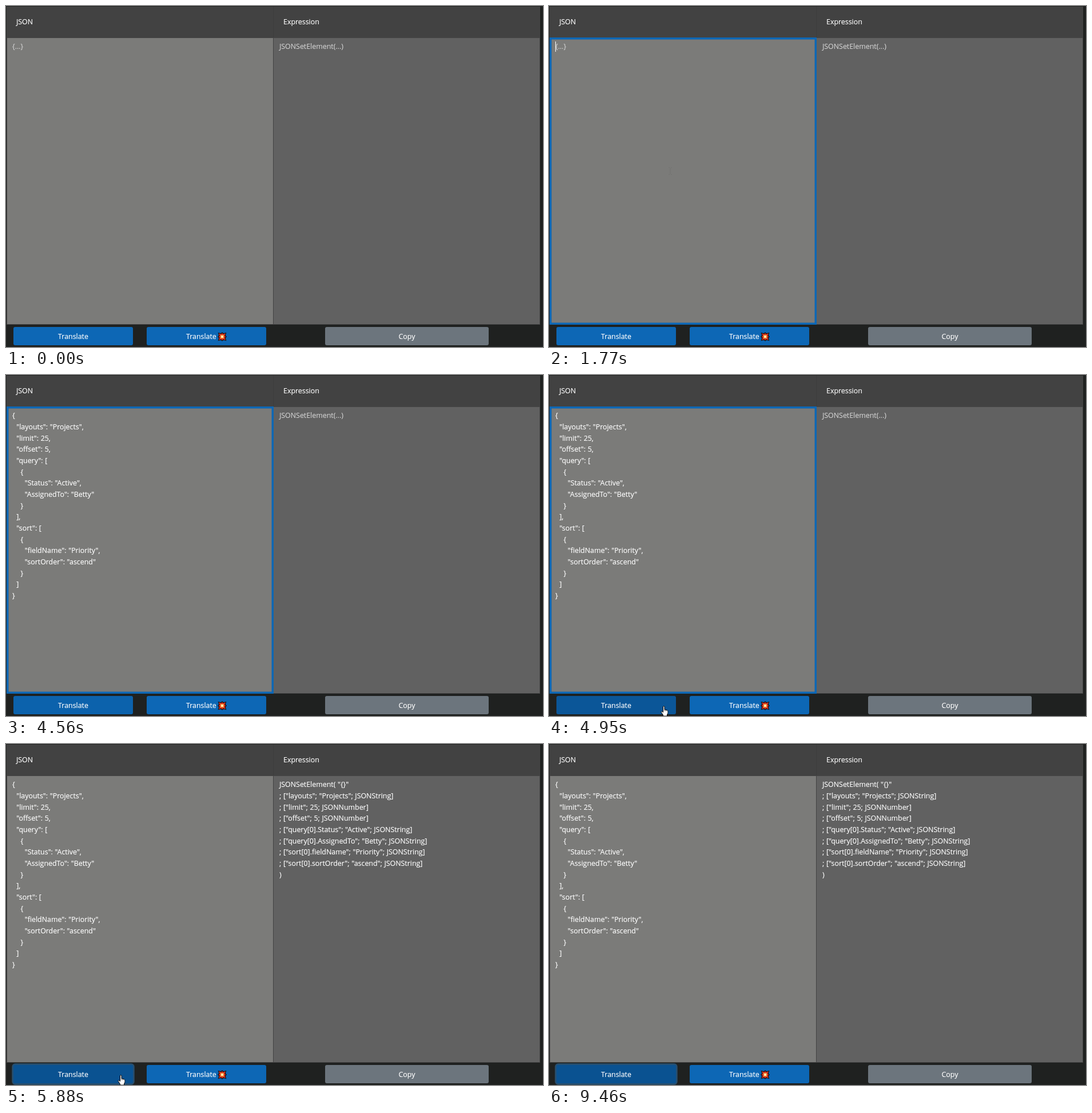
An HTML page that plays this animation: 939x596 px, repeating every 9780 ms.

```html
<!DOCTYPE html>
<html lang="en">
<head>
<meta charset="utf-8">
<title>JSON to expression</title>
<style>
html, body { margin: 0; width: 100%; height: 100%; overflow: hidden; background: #1f2120; }
#stage { position: relative; width: 939px; height: 596px; overflow: hidden; background: #1f2120; color: #fff;
  font: 12.4px/19.66px "Open Sans", "Noto Sans", sans-serif; word-spacing: .4px; -webkit-text-stroke: .15px; }
#stage > * { position: absolute; box-sizing: border-box; margin: 0; }
pre { font: inherit; white-space: pre; }
.head { top: 1px; height: 54px; background: #424242; padding: 17.4px 0 0 17px; }
.pane { top: 55px; height: 502px; border: 1px solid #444; }
.btn { top: 561px; height: 32px; border-radius: 3px; background: #0d67b5; text-align: center; padding-top: 6.6px; }
#focus { left: 1px; top: 55px; width: 467px; height: 502px; box-shadow: inset 0 0 0 3.5px #0d67b5; }
#caret { width: 1px; height: 18px; background: #fff; }
.hint { color: #d0d0d0; }
</style>
</head>
<body>
<div id="stage">
  <div class="head" style="left:1px;width:466px">JSON</div>
  <div class="head" style="left:467px;width:467px;border-left:1px solid #3c3c3c">Expression</div>
  <div class="pane" style="left:1px;width:467px;background:#7b7b79"></div>
  <div class="pane" style="left:467px;width:467px;background:#616161"></div>
  <div id="focus"></div>
  <pre id="json" style="left:11px;top:61.4px"></pre>
  <pre id="expr" style="left:478px;top:61.4px"></pre>
  <div id="caret"></div>
  <svg id="beam" style="left:209px;top:282px" width="6" height="13" fill="none" stroke="#737371">
    <path d="M0 .5H2M4 .5H6M3 1V12M0 12.5H2M4 12.5H6"/>
  </svg>
  <div class="btn" id="go" style="left:13px;width:209px">Translate</div>
  <div class="btn" style="left:246px;width:209px;text-align:left;padding-left:69px">Translate</div>
  <svg style="left:370px;top:570px" width="16" height="16" viewBox="-8 -8 16 16"><g id="burst"></g></svg>
  <div class="btn" style="left:558px;width:286px;background:#6c757d">Copy</div>
  <svg id="hand" style="left:0;top:0" width="13" height="19" fill="#fff" stroke="#000">
    <path d="M4 2C4 .3 6.5 .3 6.5 2V6.5L11 8Q12.5 8.6 12.5 10V13L11 16V18H4.5L3.5 15.5 .8 11.5Q.3 9.8 1.8 9.8L4 11.5Z"/>
    <path d="M6.5 6.5V9.5M9 7.5V9.5" stroke-width=".7"/>
  </svg>
</div>
<script>
const LOOP = 9780;
const $ = id => document.getElementById(id);

const data = {
  layouts: "Projects", limit: 25, offset: 5,
  query: [{ Status: "Active", AssignedTo: "Betty" }],
  sort: [{ fieldName: "Priority", sortOrder: "ascend" }]
};
const source = JSON.stringify(data, null, 2);

// Flatten the object into JSONSetElement arguments
function flatten(value, path) {
  if (Array.isArray(value)) return value.flatMap((v, i) => flatten(v, `${path}[${i}]`));
  if (typeof value === "object")
    return Object.entries(value).flatMap(([k, v]) => flatten(v, path ? path + "." + k : k));
  const type = typeof value === "string" ? "JSONString" : "JSONNumber";
  return [`; ["${path}"; ${JSON.stringify(value)}; ${type}]`];
}
const result = ['JSONSetElement( "{}"', ...flatten(data, ""), ")"].join("\n");

function star(outer, inner, fill) {
  const points = Array.from({ length: 16 }, (_, i) => {
    const a = i * Math.PI / 8 + Math.PI / 4;
    const r = i % 2 ? inner : outer * (i % 4 ? .75 : 1);
    return [r * Math.cos(a), r * Math.sin(a)].map(n => n.toFixed(2));
  });
  return `<polygon points="${points.join(" ")}" fill="${fill}"/>`;
}
$("burst").innerHTML = star(10.4, 6.4, "#1c0f0d") + star(8.4, 4.8, "#d8321f") +
  star(4.8, 2.6, "#f9a13a") + star(2.8, 1.6, "#fff3c4");

const within = (t, a, b) => t >= a && t < b;
const mix = (a, b, p) => a + (b - a) * p;

// Progress from 0 to 1 in n equal jumps, first at a, last at b
function steps(t, a, b, n) {
  const k = Math.floor((t - a) / (b - a) * (n - 1) + 1e-6) + 1;
  return Math.max(0, Math.min(n, k)) / n;
}

function show(id, on) { $(id).style.visibility = on ? "visible" : "hidden"; }

function setText(id, text, hint) {
  const el = $(id);
  if (el.textContent !== text) el.textContent = text;
  el.className = hint ? "hint" : "";
}

function handAt(t) {
  if (within(t, 760, 910)) {
    const p = t < 835 ? 0 : 1;
    return [mix(372, 290, p), mix(577, 556, p)];
  }
  if (within(t, 4950, 7670)) {
    const p = steps(t, 7520, 7670, 3) * 3;
    return [195.5 - 3 * p, 578 + 7 * p];
  }
  if (within(t, 9380, 9460)) return [936.5, 593.5];
  return null;
}

function draw() {
  const t = performance.now() % LOOP;
  const pasted = t >= 3020, translated = t >= 5740;
  const blur = steps(t, 5740, 5880, 3);

  setText("json", pasted ? source : "{...}", !pasted);
  setText("expr", translated ? result : "JSONSetElement(...)", !translated);
  $("focus").style.opacity = steps(t, 1620, 1770, 3) - blur;

  const blink = [[1620, 2150], [2700, 3550], [4030, 4560], [5103, 5640]];
  show("caret", blink.some(([a, b]) => within(t, a, b)));
  $("caret").style.left = (pasted ? 15 : 11) + "px";
  $("caret").style.top = (pasted ? 376 : 62) + "px";
  show("beam", within(t, 1620, 4490));

  const shade = 1 - .15 * steps(t, 4490, 4640, 3) - .05 * steps(t, 4950, 5180, 4);
  const go = $("go").style;
  go.backgroundColor = `rgb(${[13, 103, 181].map(c => Math.round(c * shade))})`;
  go.boxShadow = `0 0 0 ${2.7 * blur}px rgba(49,126,192,${.5 * blur})`;

  const pos = handAt(t);
  show("hand", pos);
  if (pos) $("hand").style.transform = `translate(${pos[0]}px,${pos[1]}px)`;
  requestAnimationFrame(draw);
}
draw();
</script>
</body>
</html>
```
